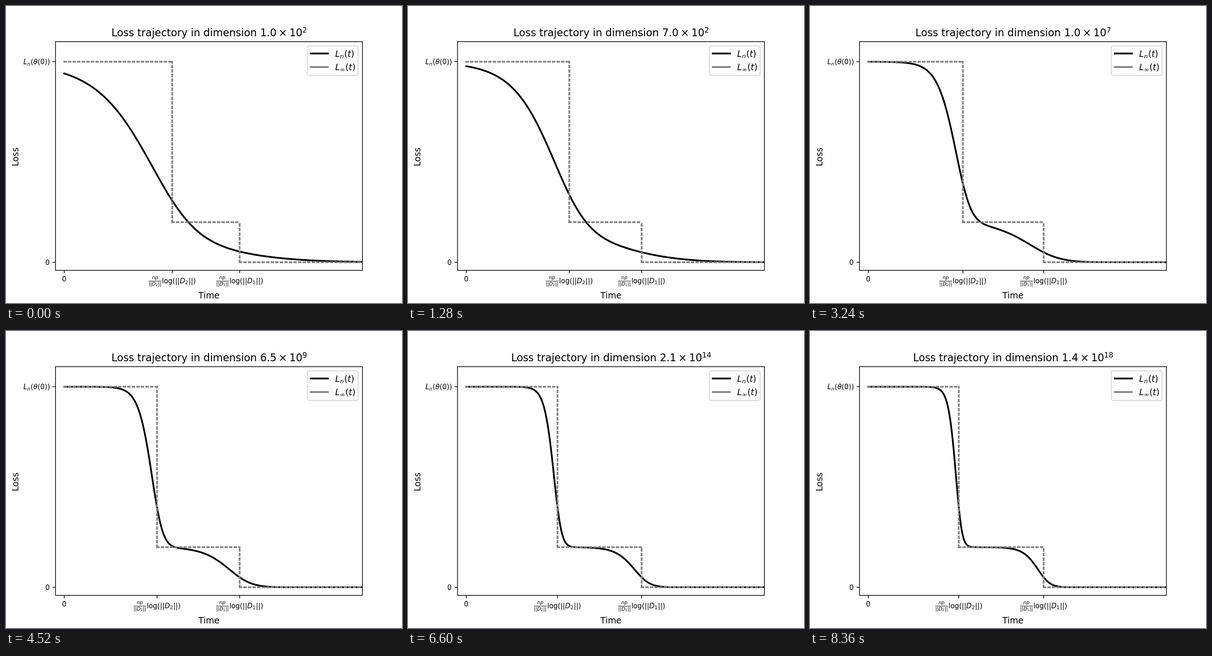
Recreate the animation shown at these times as an HTML page with a canvas. Size 864 by 648 pixels, loop 8400 ms.

```html
<!DOCTYPE html>
<html lang="en">
<head>
<meta charset="utf-8">
<title>Loss trajectory</title>
<style>
html, body { margin: 0; width: 100%; height: 100%; overflow: hidden; background: #fefefe; }
canvas { display: block; }
</style>
</head>
<body>
<canvas id="plot" width="864" height="648"></canvas>
<script>
const ctx = document.getElementById('plot').getContext('2d');
const STEP = 40, STEPS = 210;
const BOX = { left: 108, right: 777.6, top: 77.76, bottom: 576.72 };
const BOX_W = BOX.right - BOX.left, BOX_H = BOX.bottom - BOX.top;
const MID_X = BOX.left + BOX_W / 2, MID_Y = BOX.top + BOX_H / 2;
const THICK = 3.75, THIN = 1.5, TICK = 6.56;

// Data ranges: x from -0.05 to 1.7, y from -0.04 to 1.1
const px = x => BOX.left + (x + 0.05) / 1.75 * BOX_W;
const py = y => BOX.bottom - (y + 0.04) / 1.14 * BOX_H;

// kind: [font style, scale, baseline shift in em, trailing space in em]
const KINDS = {
  r: ['normal', 1, 0, 0],
  i: ['italic', 1, 0, 0],
  sub: ['normal', 0.7, 0.164, 0.05],
  isub: ['italic', 0.7, 0.164, 0.05],
  sup: ['normal', 0.7, -0.39, 0],
  op: ['normal', 1, 0, 0.2]
};

function setFont(kind, size) {
  const [style, scale] = KINDS[kind];
  ctx.font = `${style} ${size * scale}px "DejaVu Sans", sans-serif`;
}

function widthOf(parts, size) {
  return parts.reduce((sum, [text, kind]) => {
    setFont(kind, size);
    return sum + ctx.measureText(text).width + KINDS[kind][3] * size;
  }, 0);
}

// align: 0 = left, 0.5 = centre, 1 = right
function write(parts, size, x, y, align = 0) {
  x -= widthOf(parts, size) * align;
  ctx.fillStyle = '#000';
  for (const [text, kind] of parts) {
    setFont(kind, size);
    ctx.fillText(text, x, y + KINDS[kind][2] * size);
    x += ctx.measureText(text).width + KINDS[kind][3] * size;
  }
}

function line(points, width, color = '#000', cap = 'butt', dash = []) {
  ctx.beginPath();
  points.forEach(([x, y]) => ctx.lineTo(x, y));
  ctx.lineWidth = width;
  ctx.strokeStyle = color;
  ctx.lineCap = cap;
  ctx.lineJoin = 'round';
  ctx.setLineDash(dash);
  ctx.stroke();
  ctx.setLineDash([]);
}

const dotted = (...points) =>
  line(points, THICK, '#808080', 'square', [THICK, THICK * 1.65]);
const xTick = x => line([[x, BOX.bottom], [x, BOX.bottom + TICK]], THIN);
const yTick = y => line([[BOX.left, y], [BOX.left - TICK, y]], THIN);

function timeLabel(x, index) {
  const norm = [['||', 'r'], ['D', 'i'], [index, 'sub'], ['||', 'r']];
  const log = [['log(', 'r'], ...norm, [')', 'r']];
  const fraction = widthOf(norm, 10.5) + 0.5;
  const left = x - (fraction + 1.2 + widthOf(log, 15)) / 2;
  write([['np', 'i']], 10.5, left + fraction / 2, 596.2, 0.5);
  line([[left, 600.2], [left + fraction, 600.2]], 1);
  write(norm, 10.5, left + fraction / 2, 609.7, 0.5);
  write(log, 15, left + fraction + 1.2, 604.5);
}

function legend() {
  ctx.beginPath();
  ctx.roundRect(657.4, 87.1, 110.8, 64.4, 3.75);
  ctx.fillStyle = 'rgba(255,255,255,.8)';
  ctx.fill();
  ctx.lineWidth = 1.875;
  ctx.strokeStyle = '#d4d4d4';
  ctx.stroke();
  [['n', 'isub', '#000', 103.7, 110.5], ['∞', 'sub', '#808080', 133, 139.8]]
    .forEach(([index, kind, color, y, base]) => {
      line([[664.9, y], [702.4, y]], THICK, color, 'square');
      write([['L', 'i'], [index, kind], ['(', 'r'], ['t', 'i'], [')', 'r']], 18.75, 718.2, base);
    });
}

function draw(step) {
  const n = 100 + Math.floor(Math.exp(0.2 * step));
  const d1 = 2 * Math.sqrt(n), d2 = 2 * d1;
  const rate = Math.log(d1);
  const jump = Math.log(d2) / rate / 2;
  const rest = (d, tau) => ((d - 1) / (Math.exp(tau) - 1 + d)) ** 2;
  const loss = t => 0.2 * rest(d1, t * rate) + 0.8 * rest(d2, 2 * t * rate);

  ctx.fillStyle = '#fefefe';
  ctx.fillRect(0, 0, 864, 648);

  ctx.save();
  ctx.beginPath();
  ctx.rect(BOX.left, BOX.top, BOX_W, BOX_H);
  ctx.clip();
  const curve = [];
  for (let t = 0; t <= 1.72; t += 0.004) curve.push([px(t), py(loss(t))]);
  line(curve, THICK, '#000', 'square');
  const x0 = px(0), x1 = px(1), x2 = px(jump);
  const top = py(1), mid = py(0.2), low = py(0);
  dotted([x0, top], [x2, top]);
  dotted([x2, mid], [x2, top]);
  dotted([x2, mid], [x1, mid]);
  dotted([x1, low], [x1, mid]);
  dotted([x1, low], [px(1.7), low]);
  ctx.restore();

  [x0, x1, x2].forEach(xTick);
  [top, low].forEach(yTick);
  ctx.lineJoin = 'miter';
  ctx.lineWidth = THIN;
  ctx.strokeStyle = '#000';
  ctx.strokeRect(BOX.left, BOX.top, BOX_W, BOX_H);
  legend();

  const power = Math.floor(Math.log10(n));
  const lead = (Math.floor(n / 10 ** (power - 1)) / 10).toFixed(1);
  write([['Loss trajectory in dimension ', 'r'], [lead, 'op'], ['×', 'op'], ['10', 'r'], [power, 'sup']],
    22.5, MID_X + 0.6, 66.3, 0.5);
  write([['0', 'r']], 15, x0, 601, 0.5);
  timeLabel(x2, '2');
  timeLabel(x1, '1');
  write([['0', 'r']], 15, 95.4, 564.5, 1);
  write([['L', 'i'], ['n', 'isub'], ['(', 'r'], ['θ', 'i'], ['(0))', 'r']], 15, 96, 127.4, 1);
  write([['Time', 'r']], 18.75, MID_X, 638, 0.5);
  ctx.save();
  ctx.translate(27, MID_Y + 2);
  ctx.rotate(-Math.PI / 2);
  write([['Loss', 'r']], 18.75, 0, 0, 0.5);
  ctx.restore();
}

function tick() {
  draw(Math.floor(performance.now() / STEP) % STEPS);
  requestAnimationFrame(tick);
}
tick();
</script>
</body>
</html>
```
